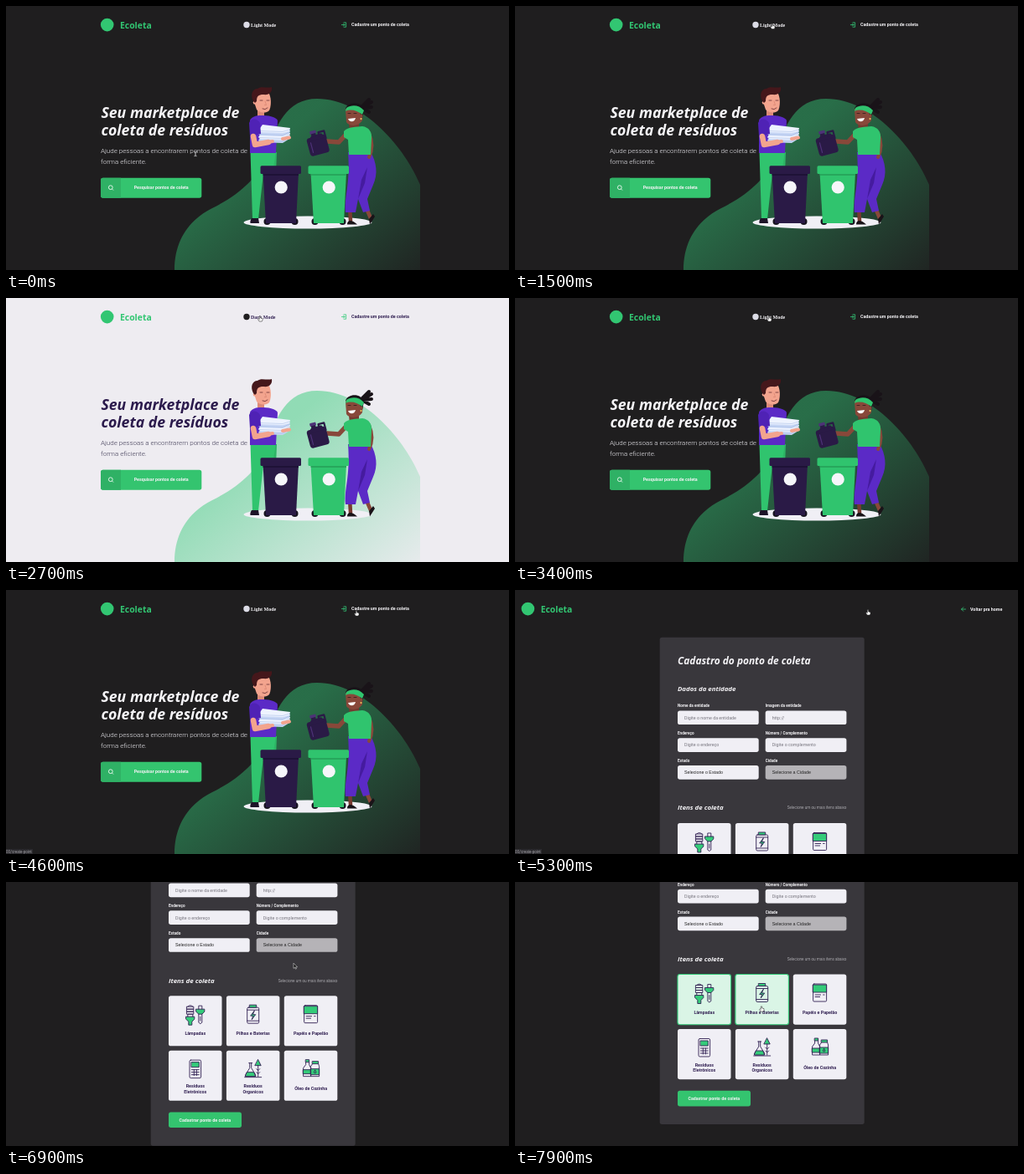
Write an HTML page that moves like this. It is 600x316 px and loops after 8 s.

```html
<!DOCTYPE html>
<html lang="pt-BR">
<head>
<meta charset="utf-8">
<title>Ponto de coleta</title>
<style>
  html, body { margin: 0; width: 100%; height: 100%; overflow: hidden; background: #1f1e1f; }
  svg { display: block; width: 600px; height: 316px; }
  #stage { --bg: #1f1e1f; --title: #f6f5f8; --body: #eeedf2; --link: #f4f3f6; --moon: #dcdce6; --near: .46; }
  #stage.light { --bg: #eeecf1; --title: #2b1a4c; --body: #3f3a55; --link: #322153; --moon: #201f21; --near: .5; }
  text { font-family: Roboto, sans-serif; font-size: 5.33px; }
  .head { font-family: "Open Sans", "Noto Sans", sans-serif; font-weight: 700; font-style: italic; }
  .brand { font-family: "Open Sans", "Noto Sans", sans-serif; font-weight: 700; font-size: 10.4px; fill: #32c672; }
  .bold { font-weight: 700; }
  .mid { text-anchor: middle; }
  .white { fill: #f4f3f6; }
  .label { font-weight: 700; font-size: 4.67px; fill: #f4f3f6; }
  .hint { fill: #77757e; }
  .select { font-family: "Liberation Sans", Arial, sans-serif; fill: #222; }
  .mode { font-family: "Liberation Serif", "Times New Roman", serif; font-weight: 700; font-size: 6px; fill: var(--link); }
  .item { fill: #f0eff5; }
  .item.on { fill: #daf5e6; stroke: #34cb79; stroke-width: 1.1; }
  .icon { fill: none; stroke: #322153; stroke-width: .9; stroke-linejoin: round; stroke-linecap: round; }
  .g { fill: #34cb79; }
  .line { fill: none; stroke: #34cb79; stroke-width: .8; stroke-linecap: round; stroke-linejoin: round; }
</style>
</head>
<body>
<svg id="stage" viewBox="0 0 600 316"></svg>
<script>
const stage = document.getElementById('stage');
const LOOP = 8000, STEP = 100;

const text = (x, y, s, cls, extra = '') => `<text x="${x}" y="${y}" class="${cls}" ${extra}>${s}</text>`;
const box = (x, y, w, h, fill, r = 0) => `<rect x="${x}" y="${y}" width="${w}" height="${h}" rx="${r}" fill="${fill}"/>`;
const shape = (d, fill) => `<path d="${d}" fill="${fill}"/>`;
const limb = (d, color, w) =>
  `<path d="${d}" fill="none" stroke="${color}" stroke-width="${w}" stroke-linecap="round" stroke-linejoin="round"/>`;
const disc = (x, y, r, fill) => `<circle cx="${x}" cy="${y}" r="${r}" fill="${fill}"/>`;
const brand = x => disc(x + 7.7, 22.6, 7.8, '#32c672') + text(x + 23, 26.5, 'Ecoleta', 'brand');

const SKIN = '#f3a48e', BROWN = '#88483a', VIOLET = '#5b2ac6', INK = '#2a1a46', GREEN = '#30c46e', HAIR = '#191318';

function bin(x, color, shade) {
  return disc(x + 8, 258, 4, '#17131f') + disc(x + 41, 258, 4, '#17131f') +
    shape(`M${x + 3} 199H${x + 45.5}L${x + 42.5} 260H${x + 6.5}Z`, color) +
    shape(`M${x + 3} 201H${x + 45.5}V203H${x + 3.2}Z`, shade) +
    box(x, 191.3, 48.5, 9.6, color, 1.5) + disc(x + 24.7, 217, 7.6, '#f6f6fa');
}

const man =
  shape('M306 175H323L320 254H312L308 200Z', '#2db565') +
  shape('M291.5 174H322L318 200L307 200L301 255H294Z', GREEN) +
  shape('M293 254H301L302 260H291.5C291 257 292 256 293 254ZM312 253H320L323 259H312Z', '#1d1428') +
  box(300, 120, 8, 14, '#dd8b78') +
  shape('M291 137C293 132 299 131 304 131C313 131 321 132 324 137L322 176H291Z', VIOLET) +
  shape('M297 105H314C317 112 316 121 314 125C310 129 302 128 299 124L297 118Z', SKIN) +
  disc(297, 115.5, 2.3, SKIN) +
  shape('M295 114C291 106 294 99 300 99C304 95 312 99 317 97C318 103 314 107 307 106C301 106 299 108 299 114L297 116Z', '#45171b') +
  limb('M303 113H306M311 113H314M306 123Q309 125 312 122', '#662b32', .8) +
  limb('M309 114L310.5 118.5H308.5', '#d98370', .7);

const papers = [0, 1, 2, 3].map(i =>
  shape(`M301 ${161 - i * 4}L306 ${154 - i * 4}L339 ${155 - i * 3}L338 ${159 - i * 3}L330 ${164 - i * 4}L303 ${163 - i * 4}Z`,
    i % 2 ? '#eef3ff' : '#c8d7f5') +
  limb(`M302 ${161.5 - i * 4}L330 ${162.5 - i * 4}L338 ${157 - i * 3}`, '#9db4e0', .5)).join('');

const manArms =
  shape('M290 140C292 134 300 134 303 140L304 153L291 156Z', '#4f22b5') +
  limb('M295 156L297 166L313 163', SKIN, 6.5) + limb('M310 163.5L318 162', SKIN, 4) +
  limb('M330 159L338 157.5', SKIN, 4);

const woman =
  limb('M429 240L435 254', BROWN, 4.5) + limb('M410 240L411 257', '#773b31', 4.5) +
  shape('M407 261.5C407 256 412 255 419 261.5ZM433 255L438 249L440 252L434 261.5Z', HAIR) +
  shape('M408 175H435C442 187 444 201 438 214L431 231L434 245L426 247L420 231L417 247L405 247C403 228 411 215 408 175Z', VIOLET) +
  shape('M424 208L431 193L428 212L420 231Z', '#451b9f') +
  limb('M433 152C437 161 438 171 433 181', BROWN, 4) +
  limb('M408 151L397 163L383 162', BROWN, 5.5) +
  shape('M409 140L421 141L421 150L410 151Z', '#743a30') +
  shape('M403 150C408 144 418 145 425 144C433 145 437 151 436 159L435 178H409L408 160L403 157Z', GREEN) +
  limb('M425 120L433 112M426 121L436 115M426 122L436 121M426 123L433 127', HAIR, 4) +
  shape('M405 124C407 116 422 115 426 123L425 137C421 144 410 145 406 139Z', BROWN) +
  shape('M405 123C408 114 424 114 427 124L425 134L421 125Z', HAIR) +
  shape('M406 122C412 118 421 118 427 125L425 130C419 125 411 123 405 126Z', GREEN) +
  disc(423.5, 131.5, 2, BROWN) + disc(423.5, 135, 1, '#f3cc60') +
  limb('M408 128.5H411M415 128.5H418', '#321a1c', .8) +
  shape('M408 135L417 134C416 139 410 140 408 135Z', '#fff');

const jug = `<g transform="rotate(-15 371 165)">` +
  box(360, 156, 23.5, 22, INK, 3.5) + shape('M360.5 160L367 154H379L383 160Z', INK) +
  box(366, 148.5, 7.5, 4, '#4d3277', 1) + box(367, 152, 5.5, 4, INK) +
  limb('M376 156V152H383V161', INK, 2.2) + limb('M364 162V174', '#4d3277', 1.2) + '</g>';

const home = `<g id="home">` +
  `<defs><linearGradient id="fade" gradientUnits="userSpaceOnUse" x1="300" y1="180" x2="446" y2="356">
    <stop stop-color="#34cb79" style="stop-opacity:var(--near)"/>
    <stop offset="1" stop-color="#34cb79" stop-opacity=".04"/></linearGradient></defs>` +
  shape('M201 316C201 279 220 255 246 242C280 225 301 205 311 178C321 143 335 111 371 111C428 111 477 172 494 214V316Z', 'url(#fade)') +
  '<ellipse cx="360" cy="259" rx="76.5" ry="7.5" fill="#f0eff5"/>' +
  man + papers + manArms + woman + jug + bin(303.5, INK, '#1e1237') + bin(360.5, GREEN, '#27a75c') +
  brand(113) +
  disc(287, 22.5, 3.7, 'var(--moon)') + text(292, 24.7, '', 'mode', 'id="mode"') +
  `<path class="line" d="M403 19.8H405.6V25.2H403M400.4 22.5H404M402.6 21L404 22.5L402.6 24"/>` +
  text(412, 24.4, 'Cadastre um ponto de coleta', 'bold', 'fill="var(--link)"') +
  ['Seu marketplace de', 'coleta de resíduos'].map((s, i) =>
    text(113.4, 134.3 + i * 20.7, s, 'head', 'style="font-size:17.7px" fill="var(--title)"')).join('') +
  ['Ajude pessoas a encontrarem pontos de coleta de', 'forma eficiente.'].map((s, i) =>
    text(113, 175.8 + i * 12.8, s, '', 'style="font-size:8px;font-weight:300" fill="var(--body)"')).join('') +
  box(113, 205.7, 120.3, 24, '#34c46f', 2.7) +
  shape('M115.7 205.7H137V229.7H115.7A2.7 2.7 0 0 1 113 227V208.4A2.7 2.7 0 0 1 115.7 205.7Z', '#2fb165') +
  '<path d="M126.6 219.1L128 220.5M122.4 217.2a2.4 2.4 0 1 0 4.8 0a2.4 2.4 0 1 0-4.8 0" fill="none" stroke="#fff" stroke-width=".8"/>' +
  text(185.2, 219.4, 'Pesquisar pontos de coleta', 'bold mid white') + '</g>';

function field(x, y, label, value, kind = 'hint', fill = '#f0eff5') {
  return text(x, y - 4, label, 'label') + box(x, y, 96.7, 16.7, fill, 2.7) + text(x + 8, y + 10.2, value, kind);
}

// Icons are drawn around their own centre.
const icons = {
  lamps: `<path class="g" d="M-11 3H-1V6L-4 9V13H-8V9L-11 6Z"/>
    <path d="M-9 3V0H-3V3M-9-9Q-6-12-3-9M-10-9H-2V-6H-10ZM-10-6H-2V-3H-10ZM-10-3H-2V0H-10Z"/>
    <path class="g" d="M1-6H11V-3L8 0H4L1-3Z"/><path d="M4-6V-10H8V-6M4 0V10Q6 13 8 10V0M6 3V8"/>`,
  battery: `<rect x="-7" y="-8" width="14" height="19" rx="1.5"/><path class="g" d="M-4-11H4V-8H-4Z"/>
    <path d="M-7-5H7M-7 8H7"/><path class="g" d="M1.5-4L-3 2H0L-1.5 6.5L3 .5H0Z"/>`,
  paper: `<rect x="-8" y="-10.5" width="16" height="21" rx="1.2"/><path class="g" d="M-8-9.5H8V-.5H-8Z"/>
    <path d="M-5.5 2.5H1M-5.5 5H0M4 2.5H5.5"/>`,
  machine: `<rect x="-6.8" y="-10.5" width="13.6" height="21.5" rx="1.5"/><path class="g" d="M-4.5-8H4.5V-2H-4.5Z"/>
    <path d="M-4.5 1H4.5M-4.5 4H4.5M-4.5 7H4.5M-1.5 1V8M1.5 1V8"/>`,
  organic: `<path d="M-5-7H-1M-4-7V-1L-9 7Q-10 9-8 9H2Q4 9 3 7L-2-1V-7"/><path class="g" d="M-7 4H1L3 9H-9Z"/>
    <path class="g" d="M6-11L9.5-4H2.5Z"/><path d="M6-4V9M4 0L6 2L8 0M4 4L6 6L8 4M-10 10H10"/>`,
  jars: `<path class="g" d="M-6-11H-2V-8H-6ZM2-9H9V-6H2Z"/><path d="M-6-8V-5L-9-1V9H0V-1L-2-5V-8M2-6L0-3V9H10V-3L9-6"/>
    <path class="g" d="M-9 1H0V6H-9ZM0 0H10V7H0Z"/><path d="M5 1.5Q2.5 5 5 5Q7.5 5 5 1.5"/>`
};

function item(i, name, ...lines) {
  const x = 194 + (i % 3) * 68.9, y = 279 + (i > 2) * 65.5, cx = x + 31.8;
  const first = i < 3 ? 47.3 : lines.length > 1 ? 44.5 : 47.8;
  return `<rect id="item${i}" class="item" x="${x}" y="${y}" width="63.5" height="60.2" rx="2.7"/>` +
    `<g class="icon" transform="translate(${cx} ${y + 22})">${icons[name]}</g>` +
    lines.map((s, n) => text(cx, y + first + n * 6.4, s, 'bold mid', 'fill="#322153"')).join('');
}

const form = `<g id="form">` + brand(7.7) +
  '<path class="line" d="M537.5 23H532.5M534.8 20.7L532.5 23L534.8 25.3"/>' +
  text(543, 24.6, 'Voltar pra home', 'bold white') +
  box(172.7, 56.8, 244, 401.7, '#39373c', 2.7) +
  text(194, 89.4, 'Cadastro do ponto de coleta', 'head white', 'style="font-size:11.9px"') +
  text(194, 120.8, 'Dados da entidade', 'head white', 'style="font-size:7.85px"') +
  field(194, 144.4, 'Nome da entidade', 'Digite o nome da entidade') +
  field(298.7, 144.4, 'Imagem da entidade', 'http://') +
  field(194, 177.2, 'Endereço', 'Digite o endereço') +
  field(298.7, 177.2, 'Número / Complemento', 'Digite o complemento') +
  field(194, 210, 'Estado', 'Selecione o Estado', 'select') +
  field(298.7, 210, 'Cidade', 'Selecione a Cidade', 'select', '#b5b3b7') +
  text(194, 263.4, 'Itens de coleta', 'head white', 'style="font-size:7.85px"') +
  text(395.4, 262.4, 'Selecione um ou mais itens abaixo', '', 'text-anchor="end" fill="#dddce1" style="font-size:4.67px;font-weight:300"') +
  item(0, 'lamps', 'Lâmpadas') + item(1, 'battery', 'Pilhas e Baterias') + item(2, 'paper', 'Papéis e Papelão') +
  item(3, 'machine', 'Resíduos', 'Eletrônicos') + item(4, 'organic', 'Resíduos', 'Organicos') + item(5, 'jars', 'Óleo de Cozinha') +
  box(194, 418.3, 87, 18.6, '#34c46f', 2.7) +
  text(237.3, 429.5, 'Cadastrar ponto de coleta', 'bold mid white') + '</g>';

const status = `<g id="status">${box(0, 310, 32, 6, '#2b2a2e')}` +
  text(0, 314.6, '00/create-point', '', 'fill="#a3a2a7" style="font-size:4.5px"') + '</g>';

const cursors = `<g id="cursor" stroke-linejoin="round">
  <path id="arrow" d="M0 0V6.2L1.5 4.9L2.5 7L3.4 6.6L2.5 4.6H4.5Z" fill="#111" stroke="#fff" stroke-width=".5"/>
  <path id="hand" d="M-.7-2Q0-3 .7-2V0L3 .6V2.5L2.2 4H-.9L-2.4 1.5L-1.6 .8L-.7 1.6Z" fill="#fff" stroke="#222" stroke-width=".55"/>
  <g id="beam" fill="none"><path d="M-1.4-2.7L0-2.2L1.4-2.7M0-2.2V2.2M-1.4 2.7L0 2.2L1.4 2.7" stroke="#e8e8ea" stroke-width="1.1"/>
    <path d="M-1.4-2.7L0-2.2L1.4-2.7M0-2.2V2.2M-1.4 2.7L0 2.2L1.4 2.7" stroke="#333" stroke-width=".45"/></g></g>`;

stage.innerHTML = '<rect width="600" height="316" fill="var(--bg)"/>' + home + form + status + cursors;

const el = id => document.getElementById(id);
const show = (id, on) => el(id).style.display = on ? '' : 'none';

// Rows hold a time and the values reached at that time.
const PATH = [[0, 226, 177], [300, 229, 170], [1000, 290, 50], [1400, 307, 23.5], [1600, 307, 23.5], [2000, 303, 24],
  [3700, 303, 24], [4200, 360, 34], [4600, 418, 27], [4800, 421, 26], [5400, 421, 26], [5900, 360, 66],
  [6300, 343, 82], [7100, 343, 100], [7400, 232, 142], [7500, 228, 145], [7800, 294, 151], [8000, 294, 151]];
const SCROLL = [[0, 0], [5600, 0], [6000, 24], [6300, 49.5], [6500, 72], [6800, 130], [7100, 168.5], [8000, 168.5]];
const CURSOR = [[0, 'beam'], [400, 'arrow'], [1300, 'hand'], [3800, 'arrow'], [4600, 'hand'],
  [5600, 'arrow'], [6100, 'beam'], [6600, 'arrow'], [7200, 'hand']];

const ease = k => k * k * (3 - 2 * k);
function along(rows, t, col, curve = k => k) {
  const i = Math.max(1, rows.findIndex(r => r[0] > t));
  const a = rows[i - 1], b = rows[i];
  return a[col] + (b[col] - a[col]) * curve((t - a[0]) / (b[0] - a[0]));
}

function draw(t) {
  const light = t >= 1700 && t < 3100, onForm = t >= 5000;
  stage.classList.toggle('light', light);
  el('mode').textContent = light ? 'Dark Mode' : 'Light Mode';
  show('home', !onForm);
  show('form', onForm);
  show('status', t >= 4600 && t < 5600);
  el('form').setAttribute('transform', `translate(0 ${-along(SCROLL, t, 1)})`);
  el('item0').classList.toggle('on', t >= 7500);
  el('item1').classList.toggle('on', t >= 7800);
  el('cursor').setAttribute('transform', `translate(${along(PATH, t, 1, ease)} ${along(PATH, t, 2, ease)})`);
  const kind = CURSOR.filter(r => r[0] <= t).pop()[1];
  ['arrow', 'hand', 'beam'].forEach(id => show(id, id === kind));
}

const start = performance.now();
function tick() {
  const t = (performance.now() - start) % LOOP;
  draw(Math.floor(t / STEP) * STEP);
  requestAnimationFrame(tick);
}
tick();
</script>
</body>
</html>
```
